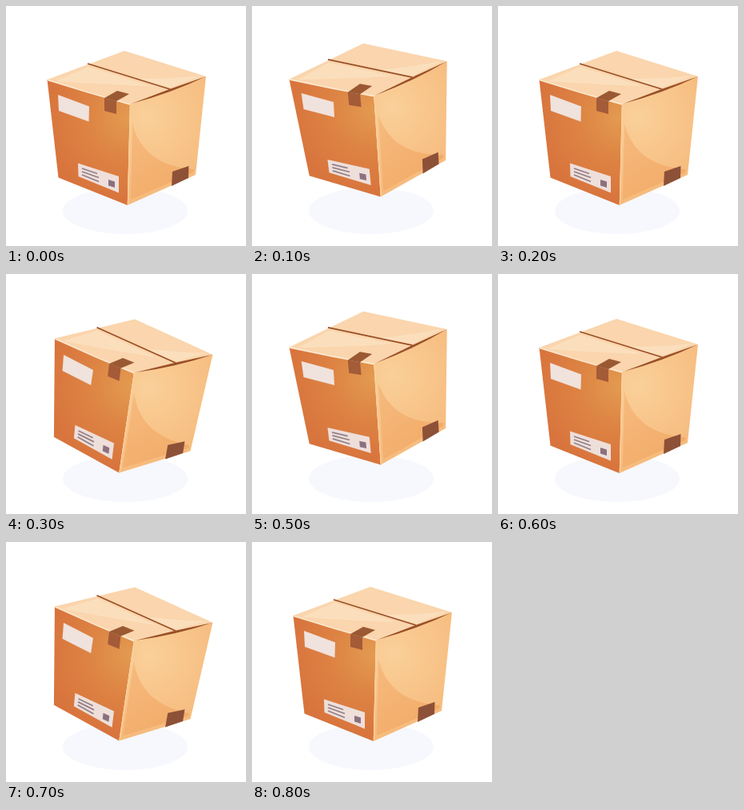
Write an HTML page that moves like this. It is 300 px wide and 300 px high and loops after 1.8 s.

```html
<!DOCTYPE html>
<html lang="en">
<head>
<meta charset="utf-8">
<title>Shaking parcel</title>
<style>
html, body { margin: 0; width: 100%; height: 100%; overflow: hidden; background: #fff; }
svg { display: block; width: 100vw; height: 100vh; }
</style>
</head>
<body>
<svg viewBox="0 0 300 300">
  <defs>
    <radialGradient id="front" gradientUnits="userSpaceOnUse" cx="152" cy="140" r="105">
      <stop offset="0" stop-color="#e39a50"/>
      <stop offset=".5" stop-color="#dd8343"/>
      <stop offset="1" stop-color="#d8743d"/>
    </radialGradient>
    <radialGradient id="side" gradientUnits="userSpaceOnUse" cx="176" cy="139" r="95">
      <stop offset="0" stop-color="#fad09a"/>
      <stop offset="1" stop-color="#f6bb7d"/>
    </radialGradient>
    <linearGradient id="shade" x1="0" y1="0" x2=".6" y2="1">
      <stop offset="0" stop-color="#f6bb7f"/>
      <stop offset="1" stop-color="#f2ab68"/>
    </linearGradient>
  </defs>
  <ellipse cx="149" cy="256" rx="78" ry="29" fill="#f6f8fd"/>
  <g id="box">
    <path fill="url(#front)" d="M51.500 92 155 122 151.800 249 65.500 214.500Z"/>
    <path fill="url(#side)" d="M155 122 250 88 237 211 151.800 249Z"/>
    <path fill="url(#shade)" d="M158 147C166 177 187 201 235 204L234 208 156 242Z"/>
    <path fill="none" stroke="#fbcf9b" stroke-width="1.5" d="M155.500 123 152.500 248"/>

    <path fill="#fad5ad" d="M51.500 92 148 56 250 88 205 105 155 123Z"/>
    <path fill="#fbdfbd" d="M64 93 103 76 180 100Q120 98 64 94Z"/>
    <path fill="#fbdfbd" d="M162 91Q205 91 243 87L206 102Z"/>
    <path fill="none" stroke="#fde9d0" stroke-width="1.8" d="M52 92.500Q104 109 155 122.800"/>
    <path fill="none" stroke="#9a5027" stroke-width="1.8" d="M102 72 205 104"/>
    <path fill="#9a5027" d="M157 122 205 103.800 250 88Q206 109 157 122Z"/>

    <path fill="#9a5932" d="M123 115 139 106 154 110 138 119Z"/>
    <path fill="#a35b38" d="M123 115 138 119 138 135 123 131Z"/>
    <path fill="#8d5138" d="M208 207 228.500 200 228 215 207 225Z"/>

    <path fill="#f0e2dc" d="M65 111 104 125.500 103.500 144.500 66 131Z"/>
    <path fill="#eedfda" d="M90 196.500 141 213 141 233.500 90.500 213Z"/>
    <path fill="none" stroke="#937f88" stroke-width="1.7" d="M95 203 114 209.500M95 207 116 214.500M95 211 116 219.500"/>
    <path fill="#8b7180" d="M128 217 136 219.500 136 227 128 224.500Z"/>
  </g>
</svg>
<script>
const box = document.getElementById("box");
const STEP = 100, LOOP = 1800;
const REST = "";
const LEFT = "translate(0 -10) rotate(-5.3 151 151)";
const RIGHT = "translate(1.5 0) rotate(7 150 151)";
const poses = [REST, LEFT, REST, RIGHT];

function draw(now) {
  const step = Math.floor(now % LOOP / STEP);
  box.setAttribute("transform", step < 8 ? poses[step % 4] : REST);
}

const start = performance.now();
function tick() {
  draw(performance.now() - start);
  requestAnimationFrame(tick);
}
tick();
</script>
</body>
</html>
```
